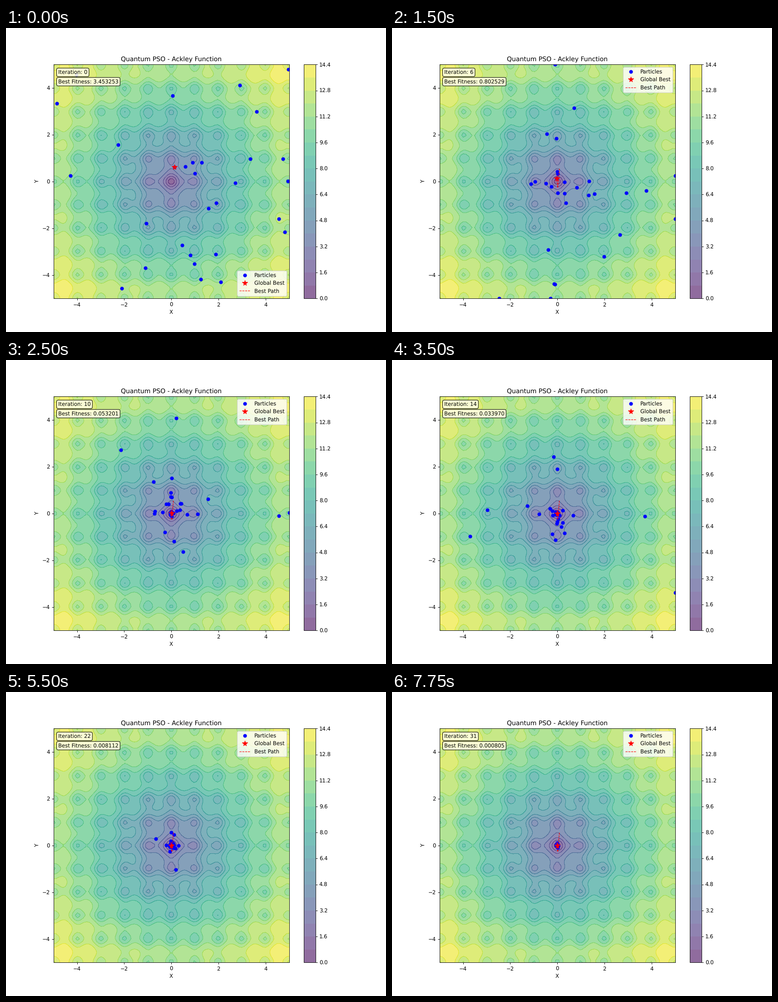
Animation of 837 by 669 pixels, one loop 8 s. Source, as a matplotlib script:

```python
import numpy as np
import matplotlib.pyplot as plt
from matplotlib.animation import FuncAnimation

plt.rcParams["font.family"] = "DejaVu Sans"
plt.rcParams["text.hinting"] = "no_hinting"

STEPS, INTERVAL, SWARM, LIMIT = 32, 250, 30, 5

# Milestones of the search: iteration, best x, best y, best fitness
MILESTONES = np.array([
    (0, 0.13, 0.62, 3.453253),
    (1, 0.09, 0.55, 3.05),
    (2, 0.02, -0.27, 1.810675),
    (6, -0.02, 0.13, 0.802529),
    (10, 0.012, 0.010, 0.053201),
    (14, -0.009, -0.005, 0.033970),
    (22, 0.002, 0.002, 0.008112),
    (31, 0, 0, 0.000805),
])


def between(values):
    return np.interp(np.arange(STEPS), MILESTONES[:, 0], values)


best = np.column_stack([between(MILESTONES[:, 1]), between(MILESTONES[:, 2])])
fitness = np.exp(between(np.log(MILESTONES[:, 3])))


def ackley(x, y):
    bowl = -20 * np.exp(-0.2 * np.sqrt(0.5 * (x**2 + y**2)))
    ripple = -np.exp(0.5 * (np.cos(2 * np.pi * x) + np.cos(2 * np.pi * y)))
    return bowl + ripple + np.e + 20


def swarm(i):
    """Uniform at first, then a heavy-tailed cloud shrinking onto the best."""
    rng = np.random.default_rng(100 + i)
    size = (SWARM - 1, 2)
    if i == 0:
        points = rng.uniform(-LIMIT, LIMIT, size)
    else:
        scale = 2 * np.exp(-i / 6.5)
        jumps = rng.laplace(0, scale, size) * rng.lognormal(0, 1, size)
        points = np.clip(best[i] + jumps, -LIMIT, LIMIT)
    return np.vstack([points, best[i]])


def legend_loc(i):
    if i == 0:
        return "lower right"
    return "lower left" if i < 4 else "upper right"


fig, ax = plt.subplots(figsize=(10, 7.993), dpi=83.7)
axis = np.linspace(-LIMIT, LIMIT, 100)
X, Y = np.meshgrid(axis, axis)
Z = ackley(X, Y)
filled = ax.contourf(X, Y, Z, levels=20, cmap="viridis", alpha=0.6)
ax.contour(X, Y, Z, levels=20, cmap="viridis", linewidths=0.5, alpha=0.55)
fig.colorbar(filled, ax=ax)

dots, = ax.plot([], [], "bo", markersize=6, label="Particles")
star, = ax.plot([], [], "r*", markersize=10, label="Global Best")
path, = ax.plot([], [], "r--", linewidth=1, label="Best Path")
ax.set(xlim=(-LIMIT, LIMIT), ylim=(-LIMIT, LIMIT), xlabel="X", ylabel="Y",
       title="Quantum PSO - Ackley Function")
legend = ax.legend(loc="upper right")


def note(y):
    box = dict(boxstyle="round", facecolor="lightyellow", alpha=0.9)
    return ax.text(0.02, y, "", transform=ax.transAxes, bbox=box)


iter_note, fit_note = note(0.96), note(0.92)


def update(i):
    dots.set_data(*swarm(i).T)
    star.set_data(*best[i:i + 1].T)
    path.set_data(*best[1:i + 1].T)
    iter_note.set_text(f"Iteration: {i}")
    fit_note.set_text(f"Best Fitness: {fitness[i]:.6f}")
    legend.set_loc(legend_loc(i))
    return dots, star, path, iter_note, fit_note, legend


anim = FuncAnimation(fig, update, frames=STEPS, interval=INTERVAL,
                     repeat=True, repeat_delay=0, blit=False)
plt.show()
```
